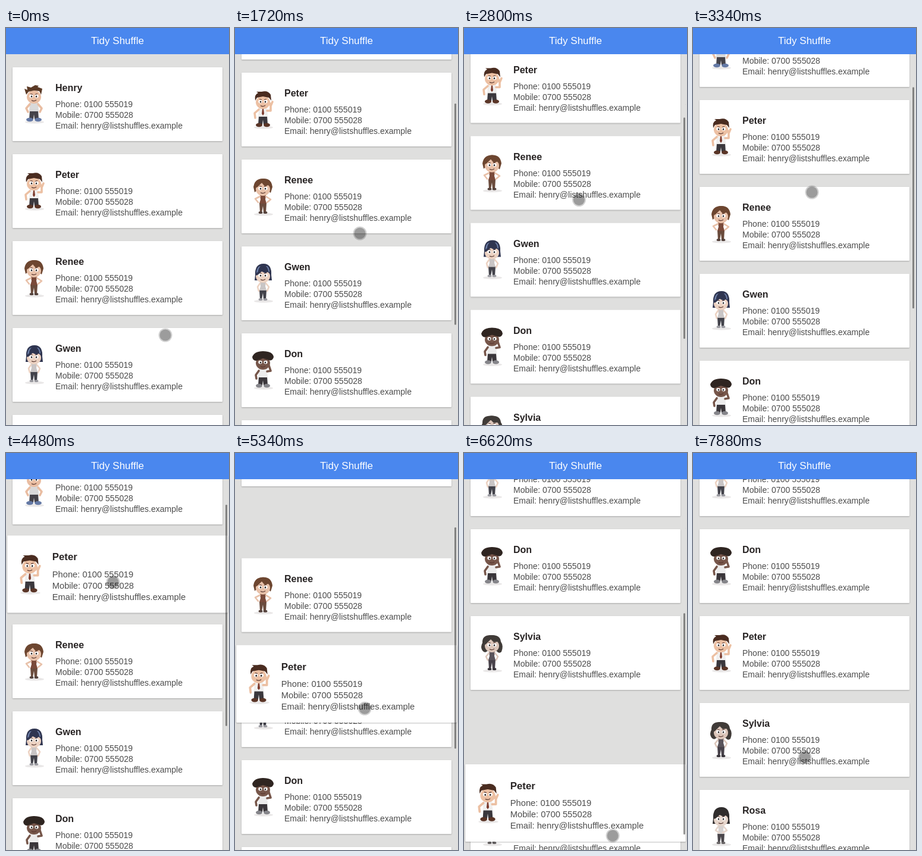
An HTML page that plays this animation: 375x667 px, repeating every 8 s.

```html
<!DOCTYPE html>
<html lang="en">
<head>
<meta charset="utf-8">
<title>Tidy Shuffle</title>
<style>
  html, body { margin: 0; width: 100%; height: 100%; overflow: hidden; background: #dfdfde; }
  svg { display: block; font: 14px "Liberation Sans", Arial, sans-serif; fill: #4c4c4c; }
  .paper { fill: #fff; filter: drop-shadow(0 1px 1px rgba(0, 0, 0, .25)); }
  .name { font-weight: bold; font-size: 16px; fill: #282424; }
  .title { font-size: 17px; fill: #fff; text-anchor: middle; }
</style>
</head>
<body>
<svg width="375" height="667" viewBox="0 0 375 667">
  <g id="list"></g>
  <rect id="bar" x="369" width="3" height="372" rx="1.5" fill="#000" fill-opacity=".42"/>
  <rect width="375" height="44" fill="#4a87ee"/>
  <text class="title" x="187.5" y="27">Tidy Shuffle</text>
  <g id="pointer">
    <circle r="11.5" fill="#000" fill-opacity=".18"/>
    <circle r="9.5" fill="#000" fill-opacity=".25"/>
  </g>
</svg>
<script>
const LOOP = 8000, PITCH = 146, FIRST = 66, HALF = 62;
const LIFT = 4480, DROP = 7640, SETTLED = 7820;
const DRAGGED = 1;

const bobBack = 'M9 20Q8 1 23 1Q37 1 36 20L37 29H8z';
const bobFringe = 'M9 21Q9 2 23 2Q36 3 36 20L30 15 26 17 20 14 13 20z';

// up: when a card slides one slot up; down: when it slides back
const people = [
  { name: 'Henry', hair: '#5b3a26', skin: '#e9bda2', top: '#d9d9da', legs: '#45434a', shoes: '#6479a5', feet: 7,
    fringe: 'M9 18L6 8 11 10 10 4 17 6 24 2 30 3 28 5 36 8 34 18 31 12 22 11 13 13z',
    arms: 'M15 34L9 41 12 47M29 34L35 41 32 47' },
  { name: 'Peter', hair: '#4a2c20', skin: '#ecc0a3', top: '#f0efee', legs: '#3b383d', shoes: '#5a3527', feet: 6.5,
    fringe: 'M9 19Q7 9 14 6L11 4 20 4Q30 1 35 9L36 19 32 14 22 12 12 14z',
    arms: 'M15 34L8 40 9 48M29 36L35 36 35 28M35 28L32 21M35 28L38 21', tie: '#7c3a2c' },
  { name: 'Renee', hair: '#6d4630', skin: '#e8c1a9', top: '#7a4a3a', legs: '#6a4b3c', shoes: '#54423c', feet: 4, up: 5226,
    back: 'M6 18Q8 4 22 4Q36 3 38 18L35 28 30 24H12L8 27z',
    fringe: 'M7 21Q8 5 22 4Q36 5 37 20L31 15 25 17 20 11 13 18z',
    arms: 'M17 34L9 38 14 44M27 34L35 39 29 44' },
  { name: 'Gwen', hair: '#2f3550', skin: '#ecd2c2', top: '#c9c5c5', legs: '#42424a', shoes: '#9a9aa0', feet: 4, up: 5410,
    back: bobBack, fringe: bobFringe, shine: '#6d7fa8', arms: 'M17 34L13 40 15 47M27 34L32 40 29 47' },
  { name: 'Don', hair: '#2f2521', skin: '#76564a', top: '#ececec', legs: '#3a363a', shoes: '#85858a', feet: 6.5, up: 5655,
    fringe: 'M4 12Q7 2 22 2Q39 2 40 12Q38 19 32 17L22 14 11 18Q5 18 4 12z',
    arms: 'M15 35L10 42 11 48M29 36L35 35 32 26' },
  { name: 'Sylvia', hair: '#403b38', skin: '#dcc6ba', top: '#59535a', legs: '#474149', shoes: '#39353b', feet: 4, up: 5920, down: 7350,
    back: 'M6 30Q2 24 6 17Q5 4 20 4Q36 3 37 15Q42 22 38 32Q34 36 30 31H14Q10 35 6 30z',
    fringe: 'M7 22Q6 5 21 4Q36 4 37 21L32 15 25 16 20 11 12 19z',
    arms: 'M17 34L12 40 15 46M27 34L32 40 29 46' },
  { name: 'Rosa', hair: '#302d2d', skin: '#e6d5cb', top: '#d6d2d1', legs: '#4a464b', shoes: '#6a6667', feet: 4,
    back: bobBack, fringe: bobFringe, arms: 'M17 34L13 40 19 44M27 34L32 40 25 44' },
];

const path = (d, fill) => d ? `<path d="${d}" fill="${fill}"/>` : '';
const oval = (x, y, rx, ry, fill) => `<ellipse cx="${x}" cy="${y}" rx="${rx}" ry="${ry}" fill="${fill}"/>`;
const pair = (gap, y, rx, ry, fill) => oval(22 - gap, y, rx, ry, fill) + oval(22 + gap, y, rx, ry, fill);
const text = (y, s, cls = '') => `<text x="72" y="${y}" class="${cls}">${s}</text>`;

function avatar(p) {
  const slim = p.back ? 'M16 45H28L27 61H23L22 50 20 61H17z' : 'M15 45H29L30 59H23L22 51 21 59H14z';
  const body = p.back ? 'M17 32H27L26 39 28 46H16L18 39z' : 'M15 31H29L30 46H14z';
  return oval(23, 64, 16, 2.5, '#e9e7e7') +
    path(p.back, p.hair) +
    path(slim, p.legs) +
    pair(p.feet, p.back ? 61 : 60, p.feet * .85, p.back ? 2 : 3.3, p.shoes) +
    path(body, p.top) +
    path(p.tie && 'M21 33H23L24 41 22 44 20 41z', p.tie) +
    `<path d="${p.arms}" fill="none" stroke="${p.skin}" stroke-width="${p.back ? 2.6 : 3.6}" stroke-linecap="round" stroke-linejoin="round"/>` +
    oval(22, 22, 12, 11, p.skin) +
    pair(4.5, 20.5, 3.2, 2.9, '#fff') +
    pair(4, 21, 1.3, 1.6, '#292526') +
    '<path d="M16 16.5L20 17.5M28 16.5L24 17.5M18 27.5Q22 30 26 27" fill="none" stroke="#5a3830" stroke-width="1.1"/>' +
    path(p.fringe, p.hair) +
    path(p.shine && 'M15 6Q11 10 11 17L14 14Q14 9 18 5zM27 5Q31 9 31 14L33 15Q33 8 29 5z', p.shine);
}

const list = document.getElementById('list');
const cards = people.map(p => {
  const g = document.createElementNS('http://www.w3.org/2000/svg', 'g');
  g.innerHTML = `<g transform="translate(-176.5 ${-HALF})">
    <rect class="paper" width="353" height="124" rx="1"/>
    <g transform="translate(14 28)">${avatar(p)}</g>
    ${text(40, p.name, 'name')}${text(67, 'Phone: 0100 555019')}
    ${text(85, 'Mobile: 0700 555028')}${text(103, 'Email: henry@listshuffles.example')}</g>`;
  return list.appendChild(g);
});
list.appendChild(cards[DRAGGED]);

// Piecewise linear track of [time, value] keys
function track(keys, t) {
  const i = keys.findIndex(k => k[0] > t);
  if (i < 0) return keys.at(-1)[1];
  if (i === 0) return keys[0][1];
  const [[t0, a], [t1, b]] = keys.slice(i - 1, i + 1);
  return a + (b - a) * (t - t0) / (t1 - t0);
}

const scroll = [[1300, 0], [1720, 137], [2080, 182], [2440, 200], [2620, 205], [3340, 91],
  [3700, 73], [4060, 70], [5100, 70], [5880, 278], [6250, 376]];
const dragY = [[4780, 203.5], [5880, 565.5], [6300, 588], [6900, 588], [DROP, 443], [SETTLED, 336]];
const dragScale = [[DROP, 1.05], [SETTLED, 1]];
const barAlpha = [[1300, 0], [1350, 1], [6800, 1], [7150, 0]];
const pointerX = [[850, 268], [1040, 256], [1350, 242], [1720, 210], [2440, 189], [3340, 200],
  [4060, 180], [4780, 180], [5880, 255], [6900, 248], [DROP, 188]];
const pointerY = [[850, 516], [1040, 500], [1350, 482], [1720, 345], [2440, 297], [3340, 276],
  [4060, 217], [4780, 217], [5880, 634], [6300, 643], [6900, 643], [DROP, 511]];

function slide(start, t) {
  const p = start ? Math.min(1, Math.max(0, (t - start) / 300)) : 0;
  return p * p * (3 - 2 * p);
}

// The motion advances in steps of 180 ms
function sample(t) {
  const base = t < 4780 ? 1720 : 5880;
  return base + Math.floor((t - base) / 180) * 180;
}

const bar = document.getElementById('bar'), pointer = document.getElementById('pointer');
const place = (el, x, y, scale = 1) => el.setAttribute('transform', `translate(${x} ${y}) scale(${scale})`);

function draw(now) {
  const time = now % LOOP, t = sample(time), top = track(scroll, t);
  people.forEach((p, i) => {
    const lifted = i === DRAGGED && time >= LIFT;
    const slot = i - slide(p.up, t) + slide(p.down, t);
    const y = lifted ? track(dragY, t) : FIRST + HALF + PITCH * slot - top;
    place(cards[i], 187.5, y, lifted ? track(dragScale, t) : 1);
  });
  bar.setAttribute('y', 45 + top * .596);
  bar.setAttribute('opacity', track(barAlpha, t));
  place(pointer, track(pointerX, t), track(pointerY, t));
  requestAnimationFrame(draw);
}
requestAnimationFrame(draw);
</script>
</body>
</html>
```
